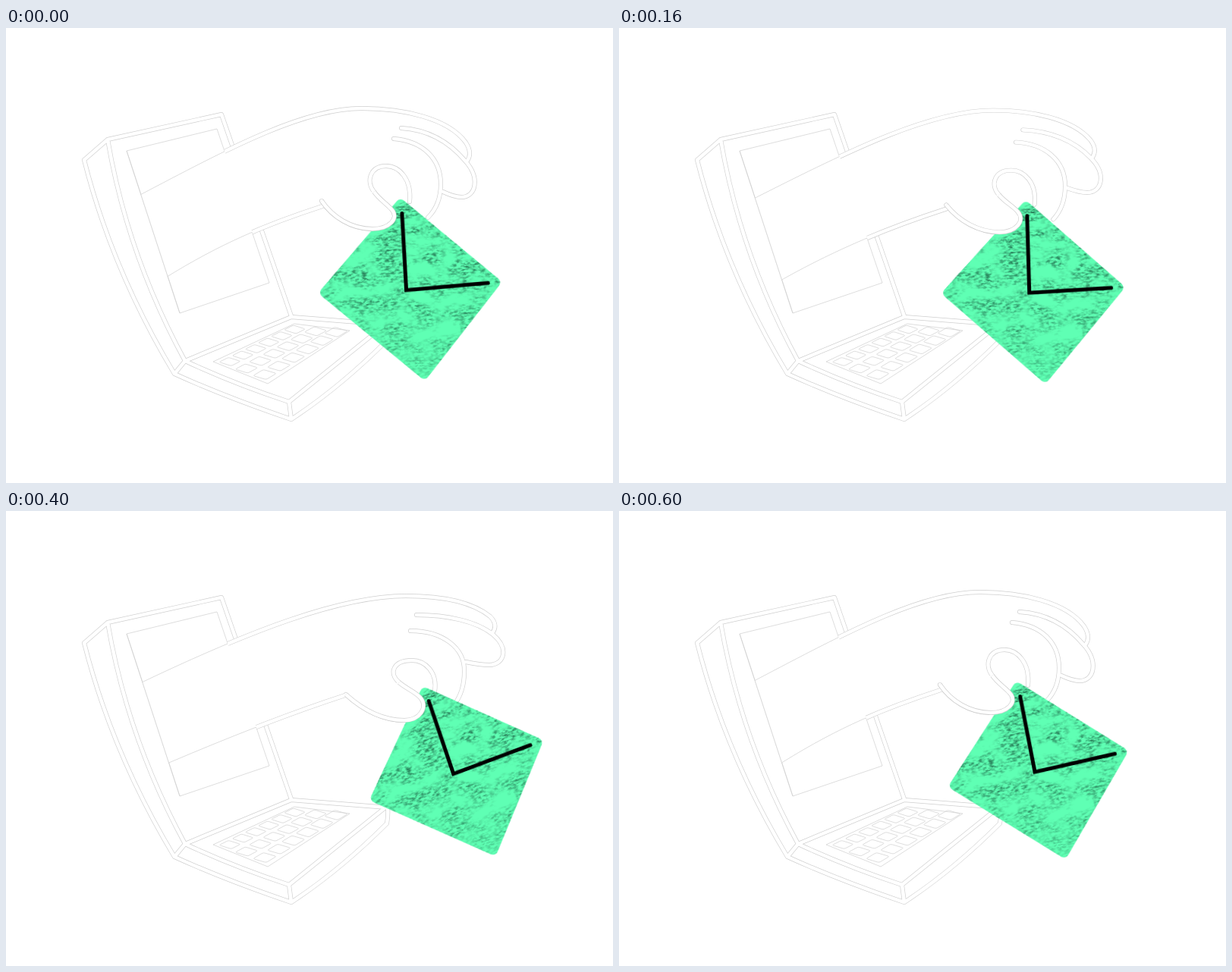
Animation, 800 px wide and 600 px high, one loop 640 ms. Source, as an HTML page without scripts:

```html
<!DOCTYPE html>
<html lang="en">
<head>
<meta charset="utf-8">
<title>Letter from a laptop</title>
<style>
  html, body { margin: 0; width: 100%; height: 100%; overflow: hidden; background: #fff; }
  svg { display: block; width: 100%; height: 100%; }

  .edge { fill: none; stroke: #cfcfcf; stroke-width: 5.9; stroke-linecap: round; stroke-linejoin: round; }
  .core { fill: none; stroke: #fff; stroke-width: 4.6; stroke-linecap: round; stroke-linejoin: round; }
  .hair { fill: none; stroke: #cfcfcf; stroke-width: .7; stroke-linejoin: round; }
  .butt { stroke-linecap: butt; }
  .key { vector-effect: non-scaling-stroke; }
  .flap { fill: none; stroke: #000; stroke-width: 5; stroke-linecap: round; }

  /* each hand line bends between pose a and pose b */
  .arm {
    --a: path("M615 176Q622 166 613 152C590 120 530 107 477 107C400 106 300 160 180 223L150 239L190 347L216 331C290 285 350 260 424 236");
    --b: path("M641 161Q649 150 638 139C612 118 570 112 527 112C440 112 320 159 181 225L150 239L190 342L217 331C290 300 370 268 447 243");
  }
  .middle {
    --a: path("M528 133C562 135 590 150 612 176C632 198 627 224 607 224Q598 224 583 217");
    --b: path("M541 137C580 137 620 145 642 163C664 182 656 203 637 203Q625 203 606 199");
  }
  .index {
    --a: path("M518 147C555 150 580 172 580 207C580 225 574 240 563 251");
    --b: path("M533 158C575 158 605 180 604 212C604 230 600 243 591 255");
  }
  .loop {
    --a: path("M539 230C542 200 525 183 508 183C487 183 481 203 492 217");
    --b: path("M565 238C569 212 552 197 535 197C510 197 504 214 518 226");
  }
  .thumb {
    --a: path("M492 217C500 228 508 232 515 240C526 252 512 266 490 266C462 266 437 250 423 229");
    --b: path("M518 226C527 234 539 238 546 246C557 259 545 276 525 276C496 276 470 262 448 242");
  }
  .slide path { d: var(--a); animation: bend .64s steps(1) infinite; }
  .slide { animation: slide .64s steps(1) infinite; }
  .swing { animation: swing .64s steps(1) infinite; }
  .keys { animation: dim .64s steps(1) infinite; }

  @keyframes bend {
    0%, 18.75% { d: var(--a); animation-timing-function: steps(3); }
    37.5%, 68.75% { d: var(--b); animation-timing-function: steps(4); }
    93.75%, 100% { d: var(--a); }
  }
  @keyframes slide {
    0%, 6.25%, 100% { transform: translate(-7px, -1px); }
    12.5%, 43.75%, 62.5%, 93.75% { transform: translate(0, 0); }
    50%, 56.25% { transform: translate(6.5px, 0); }
  }
  @keyframes swing {
    0% { transform: translate(520.2px, 233px) rotate(-3.5deg); animation-timing-function: steps(2); }
    12.5%, 18.75% { transform: translate(527px, 233px) rotate(0deg); animation-timing-function: steps(3); }
    37.5%, 43.75% { transform: translate(555.5px, 243px) rotate(-5.8deg); }
    50% { transform: translate(562px, 241.5px) rotate(-14.5deg); animation-timing-function: steps(2); }
    62.5%, 68.75% { transform: translate(552.5px, 240px) rotate(-19deg); animation-timing-function: steps(2); }
    81.25% { transform: translate(536.5px, 237.5px) rotate(-18deg); animation-timing-function: steps(2); }
    93.75% { transform: translate(525.5px, 233.5px) rotate(-11.3deg); }
    100% { transform: translate(520.2px, 233px) rotate(-3.5deg); }
  }
  @keyframes dim {
    0%, 56.25%, 100% { opacity: 1; }
    50% { opacity: .3; }
  }
</style>
</head>
<body>
<svg viewBox="0 0 800 600">
  <defs>
    <path id="laptop" d="M103 174L134 147L284 114L376 380
      M103 174Q140 320 222 456Q290 487 376 516
      M134 147Q160 300 236 439L376 381L503 391Q504 400 502 412Q440 474 376 516
      M222 456L236 439Q300 469 373 493L376 516M373 493L500 391"/>
    <path id="screen" d="M159 162L278 133L347 336L229 376z"/>

    <rect id="key" class="key" x="-.36" y="-.36" width=".72" height=".72" rx=".1"/>
    <g id="row">
      <use href="#key"/><use href="#key" x="1"/><use href="#key" x="2"/>
      <use href="#key" x="3"/><use href="#key" x="4"/><use href="#key" x="5"/>
    </g>
    <path id="letter" d="M0 0L117.5 110L17 224L-106 109.5z" stroke-width="14" stroke-linejoin="round"/>

    <clipPath id="inScreen"><use href="#screen"/></clipPath>
    <clipPath id="pastScreen"><path d="M250 50L437 600H800V50z"/></clipPath>
    <clipPath id="fromScreen"><path d="M106 0L302 600H800V0z"/></clipPath>

    <linearGradient id="shade" x2="0" y2="1">
      <stop offset="0" stop-color="#fff"/>
      <stop offset=".5" stop-color="#ddd"/>
      <stop offset="1" stop-color="#888"/>
    </linearGradient>
    <mask id="fade" maskUnits="userSpaceOnUse" x="-120" y="-10" width="250" height="245">
      <rect x="-120" y="-10" width="250" height="245" fill="url(#shade)"/>
    </mask>
    <!-- fine specks gathered into soft patches -->
    <filter id="grain" filterUnits="userSpaceOnUse" x="-120" y="-10" width="250" height="245" color-interpolation-filters="sRGB">
      <feTurbulence type="fractalNoise" baseFrequency=".03 .05" numOctaves="3" seed="4"/>
      <feColorMatrix values="0 0 0 0 0  0 0 0 0 0  0 0 0 0 0  3 0 0 0 -1" result="patches"/>
      <feTurbulence type="fractalNoise" baseFrequency=".16 .36" numOctaves="3" seed="9"/>
      <feColorMatrix values="0 0 0 0 .14  0 0 0 0 .46  0 0 0 0 .32  2.8 0 0 0 -1.1"/>
      <feComposite in2="patches" operator="in"/>
      <feComposite in2="SourceAlpha" operator="in"/>
    </filter>
  </defs>

  <use href="#laptop" class="edge"/>
  <use href="#laptop" class="core"/>
  <use href="#screen" class="hair"/>
  <g class="hair keys">
    <path d="M273 440L380 390L453 399L345 469z"/>
    <use href="#row" transform="matrix(17.1 -8.5 22 7 295 440)"/>
    <use href="#row" transform="matrix(18.2 -9.8 23 7 317 449)"/>
    <use href="#row" transform="matrix(18.8 -11.2 24 7 341 457)"/>
  </g>

  <g clip-path="url(#fromScreen)"><g class="slide"><path class="arm" fill="#fff"/></g></g>
  <g clip-path="url(#inScreen)"><g class="slide"><path class="arm hair"/></g></g>
  <g clip-path="url(#pastScreen)">
    <g class="slide">
      <g class="edge">
        <path class="arm"/><path class="middle"/><path class="index"/><path class="loop"/><path class="thumb"/>
      </g>
      <g class="core">
        <path class="arm"/><path class="middle"/><path class="index"/><path class="loop"/><path class="thumb"/>
      </g>
    </g>
  </g>
  <path class="hair" d="M159 162L229 376"/>

  <g class="swing">
    <use href="#letter" fill="#5fffb4" stroke="#5fffb4"/>
    <g mask="url(#fade)"><use href="#letter" fill="#000" stroke="#000" filter="url(#grain)"/></g>
    <path class="flap" d="M1 11.5L.5 113L108.5 110"/>
  </g>

  <g class="slide">
    <path class="thumb" fill="#fff"/>
    <path class="thumb edge butt"/>
    <path class="thumb core butt"/>
  </g>
</svg>
</body>
</html>
```
